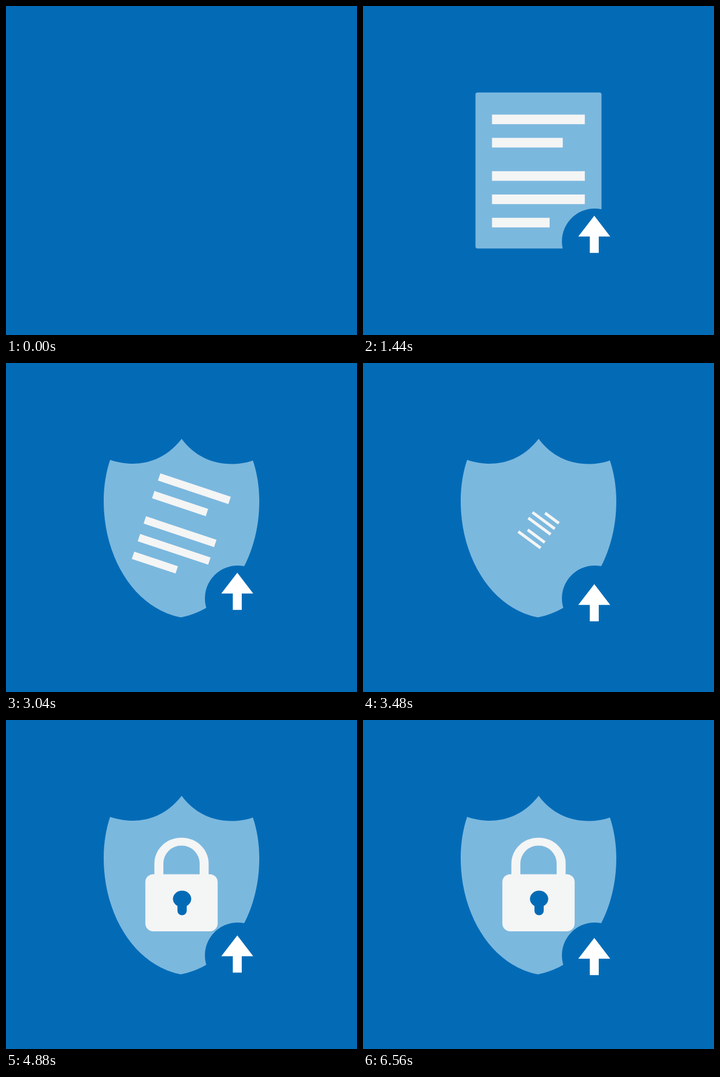
Write an HTML page that moves like this. It is 600x562 px and loops after 6.6 s.

```html
<!DOCTYPE html>
<html lang="en">
<head>
<meta charset="utf-8">
<title>Secure document upload</title>
<style>
  html, body { margin: 0; width: 100%; height: 100%; overflow: hidden; background: #036bb6; }
  svg { display: block; width: 100%; height: 100%; }
  .pale { fill: #7bb8de; }
  .light { fill: #f4f5f5; }
  .blue { fill: #036bb6; }
</style>
</head>
<body>
<svg viewBox="0 0 600 562">
  <rect id="page" class="pale" x="-107.7" y="-133.2" width="215.4" height="266.4" rx="3.6"/>
  <path id="shield" class="pale" d="M.3-153.5C-21-126-50-111-83-111C-97-111-110-113.5-122-117.5
    C-129-97-133-73-133-47C-133 52-78 137-1 151.5C78 137 133 52 133-47C133-72 129-96 122-116.5
    C111-112.5 98-110.5 85-110.5C52-110.5 21-125 .3-153.5Z"/>
  <g id="lines" class="light">
    <rect x="-79.5" y="-95.5" width="158.7" height="16.4"/>
    <rect x="-79.5" y="-55.7" width="121" height="16.4"/>
    <rect x="-79.5" y="1.2" width="158.7" height="16.4"/>
    <rect x="-79.5" y="41" width="158.7" height="16.4"/>
    <rect x="-79.5" y="80.8" width="98.5" height="16.4"/>
  </g>
  <g id="lock">
    <path class="light" d="M-46.4-10V-36A46.4 44 0 0 1 46.4-36V-10H31V-36A31 30.5 0 0 0-31-36V-10Z"/>
    <rect class="light" x="-61.8" y="-17.6" width="123.6" height="97.5" rx="13.5"/>
    <ellipse class="blue" cx="1" cy="24.6" rx="15.6" ry="14"/>
    <rect class="blue" x="-6.9" y="26" width="15.8" height="26.6" rx="7.9"/>
  </g>
  <g id="badge">
    <circle class="blue" r="56"/>
    <path id="arrow" fill="#fff" d="M-.6-44L26.6-8.5H7V19.5H-8.3V-8.5H-28Z"/>
  </g>
</svg>
<script>
const LOOP = 6600;
const clamp = u => Math.min(1, Math.max(0, u));
const ease = u => u * u * (3 - 2 * u);
const ramp = (t, start, end) => ease(clamp((t - start) / (end - start)));

// Grow from nothing to an overshoot, then settle at full size.
function pop(t, start, duration, peak) {
  const top = start + duration * 0.368;
  return t < top
    ? peak * ramp(t, start, top)
    : peak + (1 - peak) * ramp(t, top, start + duration);
}

function place(id, x, y, scale = 1, angle = 0) {
  document.getElementById(id).setAttribute('transform',
    `translate(${x} ${y}) rotate(${angle}) scale(${scale})`);
}

// The arrow glides up and down in turn, resting 200 ms at each end.
function arrowShift(t) {
  const turn = Math.floor((t - 600) / 800);
  const start = 600 + turn * 800;
  const moved = ramp(t, start, start + 600);
  return 22 * (turn % 2 ? moved : 1 - moved);
}

function draw(t) {
  const pageScale = pop(t, 0, 680, 1.2);
  const linesScale = pageScale * (1 - 0.2 * ramp(t, 2200, 2800)) * (1 - ramp(t, 3200, 3680));
  const spin = Math.max(0, t - 3000) * 0.45;

  place('page', 300, 281, pageScale * (1 - ramp(t, 2200, 2450)));
  place('shield', 300, 283, pop(t, 2200, 600, 1.26));
  place('lines', 300, 281, linesScale, spin);
  place('lock', 300, 281, pop(t, 3680, 680, 1.365));
  place('badge', 396, 402, pop(t, 680, 500, 1.2));
  place('arrow', 0, arrowShift(t));
}

const begin = performance.now();
function tick() {
  draw((performance.now() - begin) % LOOP);
  requestAnimationFrame(tick);
}
draw(0);
requestAnimationFrame(tick);
</script>
</body>
</html>
```
